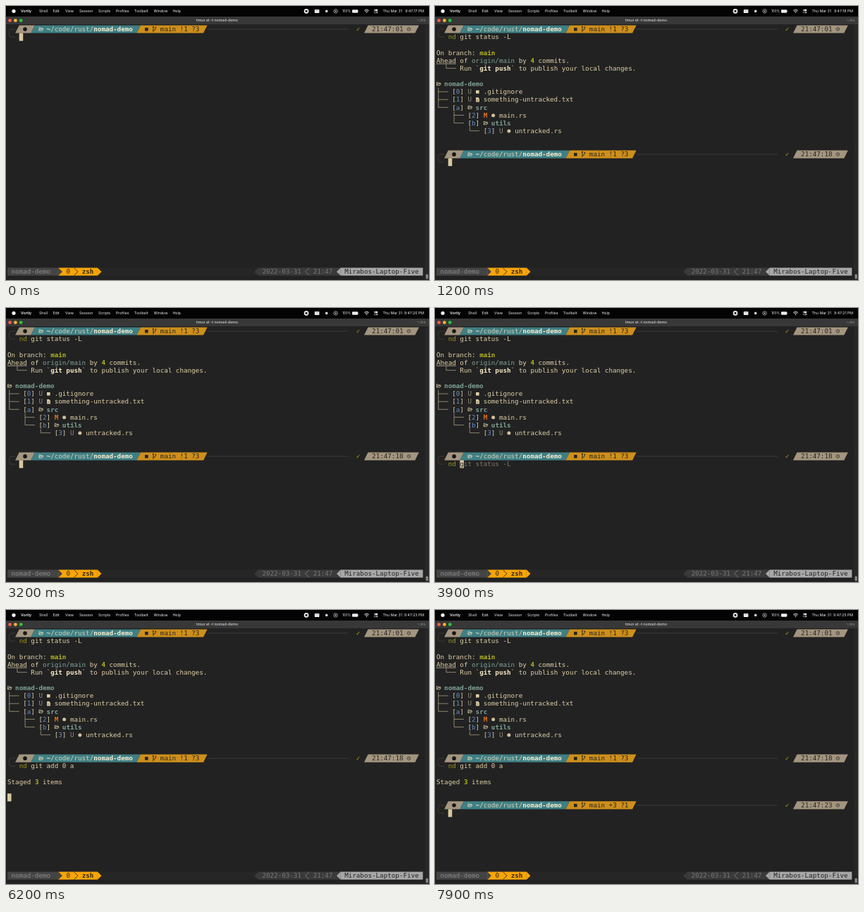
Write an HTML page that moves like this. It is 600 px wide and 390 px high and loops after 8 s.

```html
<!DOCTYPE html>
<html lang="en">
<head>
<meta charset="utf-8">
<title>Terminal session</title>
<style>
  html, body { margin: 0; width: 100%; height: 100%; overflow: hidden; background: #222; }
  svg { display: block; width: 600px; height: 390px; }
  text { white-space: pre; }
  .mono { font: 9.235px "DejaVu Sans Mono", monospace; }
  .ui { font: 5.2px Inter, Roboto, sans-serif; }
  .mono.bold { font-weight: 700; }
  .ui.bold { font-weight: 600; }
</style>
</head>
<body>
<svg id="stage" viewBox="0 0 600 390"></svg>
<script>
const LOOP = 8000;
const CELL = 5.56, LINE = 11.135, LEFT = 2, TOP = 27.4;
const C = {
  fg: '#dfcfa7', dim: '#827769', dark: '#282623', tan: '#a3957f', teal: '#3f7f84', orange: '#ce8f1b',
  green: '#98971a', lime: '#b5b524', aqua: '#7fa395', blue: '#5f8fd3', red: '#e8701c',
  frame: '#45413c', tree: '#b3a68b', cursor: '#d8c8a0'
};
const stage = document.getElementById('stage');
const colX = col => LEFT + col * CELL;
const rowY = row => TOP + row * LINE;

function add(parent, tag, attrs = {}, content) {
  const node = document.createElementNS('http://www.w3.org/2000/svg', tag);
  for (const key in attrs) node.setAttribute(key, attrs[key]);
  if (content !== undefined) node.textContent = content;
  parent.appendChild(node);
  return node;
}
const group = () => add(stage, 'g');
const rect = (parent, x, y, width, height, fill, rx = 0) =>
  add(parent, 'rect', { x, y, width, height, fill, rx });
const circle = (parent, cx, cy, r, fill) => add(parent, 'circle', { cx, cy, r, fill });
const fillPath = (parent, d, fill) => add(parent, 'path', { d, fill });
const strokePath = (parent, d, stroke, width = 0.8) =>
  add(parent, 'path', { d, stroke, fill: 'none', 'stroke-width': width });
const ui = (x, y, content, fill = '#f2f2f2', bold = false) =>
  add(stage, 'text', { x, y, fill, class: bold ? 'ui bold' : 'ui' }, content);

function put(parent, col, row, content, fill = C.fg, bold = false) {
  return add(parent, 'text', {
    x: colX(col), y: rowY(row) + 8.8, fill, class: bold ? 'mono bold' : 'mono'
  }, content);
}

// Consecutive [text, colour, bold] runs on one row.
function runs(parent, col, row, parts) {
  for (const [content, fill, bold] of parts) {
    put(parent, col, row, content, fill, bold);
    col += content.length;
  }
}

function folder(parent, col, row, color) {
  const x = colX(col), y = rowY(row) + 3.4;
  strokePath(parent, `M${x + 0.5} ${y + 4.2}V${y}h2l.7 .9h2.3v1M${x + 0.5} ${y + 4.2}l1.3 -2.3h4.4l-1.2 2.3z`, color, 0.75);
}

function gitMark(parent, col, row, color) {
  rect(parent, colX(col) + 0.4, rowY(row) + 3.5, 4.6, 4.6, color);
}

function branch(parent, col, row) {
  const x = colX(col) + 1.2, y = rowY(row) + 1.8;
  strokePath(parent, `M${x} ${y}v7.8M${x} ${y + 5.6}q3.4 -.4 3.4 -3.2v-.8`, C.dark, 0.9);
  circle(parent, x, y + 0.4, 0.9, C.dark);
  circle(parent, x + 3.4, y + 1.2, 0.9, C.dark);
}

function page(parent, col, row) {
  const x = colX(col) + 0.5, y = rowY(row) + 2.5;
  fillPath(parent, `M${x} ${y}h3l1.8 1.8v4.6h-4.8z`, C.fg);
  strokePath(parent, `M${x + 1} ${y + 3}h2.8m-2.8 1.5h2.8`, '#555047', 0.5);
}

function slant(parent, from, to, row, fill) {
  const y = rowY(row);
  fillPath(parent, `M${colX(from)} ${y + LINE}L${colX(from + 1)} ${y}H${colX(to + 1)}L${colX(to)} ${y + LINE}z`, fill);
}

function prompt(parent, row, changes, time) {
  const mid = rowY(row) + LINE / 2, end = colX(2);
  strokePath(parent, `M${end} ${mid}H7q-2.2 0 -2.2 2.2v${LINE - 4.4}q0 2.2 2.2 2.2H${end}`, C.frame);
  slant(parent, 2, 6, row, C.tan);
  slant(parent, 6, 33, row, C.teal);
  slant(parent, 33, 50, row, C.orange);
  slant(parent, 91, 104, row, C.tan);
  circle(parent, colX(4.5), mid, 2.8, '#161616');
  folder(parent, 8, row, '#eee2c3');
  runs(parent, 10, row, [['~', '#f5e8c6', true], ['/code/rust/', '#d8d1b5'], ['nomad-demo', '#f8edcf', true]]);
  gitMark(parent, 35, row, C.dark);
  branch(parent, 37, row);
  put(parent, 39, row, 'main ' + changes, C.dark);
  strokePath(parent, `M${colX(51)} ${mid}H${colX(87)}`, C.frame);
  put(parent, 89, row, '✓', '#aaa21b');
  put(parent, 93, row, time, C.dark);
  const cx = colX(102.4);
  add(parent, 'circle', { cx, cy: mid, r: 2.3, fill: 'none', stroke: C.dark, 'stroke-width': 0.7 });
  strokePath(parent, `M${cx} ${mid - 1.3}v1.5h1`, C.dark, 0.6);
}

function elbow(parent, col, row, last) {
  const x = colX(col + 0.5), y = rowY(row), mid = y + LINE / 2;
  strokePath(parent, `M${x} ${y}V${last ? mid : y + LINE}M${x} ${mid}H${colX(col + 3)}`, C.tree, 0.75);
}

function entry(parent, col, row, last, key, status, icon, name) {
  elbow(parent, col, row, last);
  runs(parent, col + 4, row, [['[', C.fg], [key, C.blue], [']', C.fg]]);
  if (!status) {
    folder(parent, col + 8, row, C.fg);
    put(parent, col + 10, row, name, C.aqua, true);
    return;
  }
  const modified = status === 'M';
  put(parent, col + 8, row, status, modified ? C.red : '#91877a', modified);
  icon(parent, col + 10, row, C.fg);
  put(parent, col + 12, row, name);
}

const rustMark = (parent, col, row) => circle(parent, colX(col + 0.5), rowY(row) + 5.8, 2.5, '#cfc19f');

function statusReport(parent) {
  runs(parent, 0, 3, [['On branch: ', C.fg], ['main', C.lime, true]]);
  runs(parent, 0, 4, [['Ahead', C.fg], [' of ', C.fg], ['origin/main', C.aqua], [' by ', C.fg], ['4', C.lime, true], [' commits.', C.fg]]);
  strokePath(parent, `M${colX(0)} ${rowY(4) + 10.3}H${colX(5)}`, C.fg, 0.7);
  elbow(parent, 2, 5, true);
  runs(parent, 6, 5, [['Run `', C.fg], ['git push', '#f6e9c6', true], ['` to publish your local changes.', C.fg]]);
  folder(parent, 0, 7, C.fg);
  put(parent, 2, 7, 'nomad-demo', C.aqua, true);
  entry(parent, 0, 8, false, '0', 'U', gitMark, '.gitignore');
  entry(parent, 0, 9, false, '1', 'U', page, 'something-untracked.txt');
  entry(parent, 0, 10, true, 'a', '', null, 'src');
  entry(parent, 4, 11, false, '2', 'M', rustMark, 'main.rs');
  entry(parent, 4, 12, true, 'b', '', null, 'utils');
  entry(parent, 8, 13, true, '3', 'U', rustMark, 'untracked.rs');
}

function menuBar() {
  rect(stage, 0, 0, 600, 15, '#030303');
  circle(stage, 11, 7.3, 2.6, '#f2f2f2');
  ui(21, 9.2, 'Vortly', '#f5f5f5', true);
  const menus = { Shell: 47, Edit: 66.5, View: 84, Session: 104, Scripts: 131, Profiles: 156, Toolbelt: 182, Window: 209.5, Help: 236.5 };
  for (const name in menus) ui(menus[name], 9.2, name);
  circle(stage, 426, 7.4, 3.3, '#f2f2f2');
  rect(stage, 424.6, 6, 2.8, 2.8, '#111', 0.4);
  rect(stage, 437.8, 5, 6.6, 5, '#eee', 0.7);
  strokePath(stage, 'M438.8 6.6h4.6', '#777', 0.5);
  circle(stage, 454.7, 7.4, 1.8, '#ddd');
  add(stage, 'circle', { cx: 467.6, cy: 7.4, r: 2.7, fill: 'none', stroke: '#ddd', 'stroke-width': 0.7 });
  fillPath(stage, 'M466.8 6l2.2 1.4l-2.2 1.4z', '#ddd');
  ui(477, 9.1, '100%').style.fontSize = '4.6px';
  rect(stage, 491, 5.2, 8.2, 4.5, '#eee', 1);
  rect(stage, 499.6, 6.6, 0.7, 1.7, '#999');
  strokePath(stage, 'M508.2 6.5q3.3 -3 6.6 0M509.4 7.9q2.1 -1.8 4.2 0', '#eee', 0.9);
  circle(stage, 511.5, 9.2, 0.8, '#eee');
  rect(stage, 522, 4.8, 5.4, 2.3, '#eee', 1.1);
  circle(stage, 523.3, 5.95, 0.7, '#111');
  add(stage, 'rect', { x: 522.2, y: 8, width: 5, height: 1.9, rx: 0.9, fill: 'none', stroke: '#eee', 'stroke-width': 0.5 });
  circle(stage, 526.2, 8.95, 0.8, '#eee');
  ui(534.5, 9.2, 'Thu Mar 31');
}

function titleBar() {
  rect(stage, 0, 15, 600, 11, '#383838', 2);
  rect(stage, 0, 20, 600, 6, '#383838');
  ['#fb5c55', '#f5b82e', '#2bc441'].forEach((color, i) => circle(stage, 5.6 + i * 7.8, 20.6, 2.4, color));
  ui(299.5, 22.3, 'tmux at -t nomad-demo', '#c2c2c2', true).setAttribute('text-anchor', 'middle');
  const shortcut = ui(595.5, 22.2, '⌥⌘6', '#8a8a8a');
  shortcut.setAttribute('text-anchor', 'end');
  shortcut.style.font = '4.6px "DejaVu Sans", sans-serif';
}

function tmuxBar() {
  const y = rowY(31), mid = y + LINE / 2, bottom = y + LINE;
  const band = (from, to, fill) => rect(stage, colX(from), y, (to - from) * CELL, LINE, fill);
  const tip = (base, point, fill) => fillPath(stage, `M${colX(base)} ${y}L${colX(point)} ${mid}L${colX(base)} ${bottom}z`, fill);
  const chevron = (base, point, color) => strokePath(stage, `M${colX(base)} ${y + 0.4}L${colX(point)} ${mid}L${colX(base)} ${bottom - 0.4}`, color, 0.8);
  band(0, 106, '#262626');
  band(13, 23, '#f7a507');
  band(0, 13, '#444');
  tip(13, 14, '#444');
  tip(23, 24, '#f7a507');
  put(stage, 1, 31, 'nomad-demo', '#8d8d8d');
  put(stage, 15, 31, '0', '#302614');
  chevron(17, 18, '#302614');
  put(stage, 19, 31, 'zsh', '#302614', true);
  tip(64, 63, '#3a3a3a');
  band(64, 85, '#3a3a3a');
  put(stage, 65, 31, '2022-03-31', '#777');
  chevron(77, 76, '#858585');
  put(stage, 78, 31, '21:47', '#777');
  tip(85, 84, '#a7a7a7');
  band(85, 106, '#a7a7a7');
  put(stage, 86, 31, 'Mirabos-Laptop-Five', '#242424');
}

rect(stage, 0, 0, 600, 390, '#222');
menuBar();
titleBar();
rect(stage, 594, 26, 6, 364, '#272727');
rect(stage, 595.6, 381.5, 3.2, 7, '#8b8b8b', 1.6);
tmuxBar();

prompt(stage, 0, '!1 ?3', '21:47:01');
const report = group(), secondPrompt = group(), staged = group(), thirdPrompt = group();
statusReport(report);
prompt(secondPrompt, 16, '!1 ?3', '21:47:18');
runs(staged, 0, 19, [['Staged ', C.fg], ['3', C.lime, true], [' items', C.fg]]);
prompt(thirdPrompt, 22, '+3 ?1', '21:47:23');

const cursor = rect(stage, 0, 0, CELL, LINE, C.cursor);
const clock = ui(593, 9.2, '');
clock.setAttribute('text-anchor', 'end');

function commandLine(row) {
  const parts = [C.green, C.fg, C.dark, C.dim].map(color => put(stage, 3, row, '', color));
  return (typed, hint) => {
    const pieces = [typed.slice(0, 2), typed.slice(2), hint.slice(0, 1), hint.slice(1)];
    let col = 3;
    parts.forEach((part, i) => {
      part.textContent = pieces[i];
      part.setAttribute('x', colX(col));
      col += pieces[i].length;
    });
  };
}
const firstLine = commandLine(1), secondLine = commandLine(17);

const STATUS = 'nd git status -L', ADD = 'nd git add 0 a';
const REPORT_AT = 700, PROMPT2_AT = 850, STAGED_AT = 6000, PROMPT3_AT = 6300;
const firstKeys = [200, 300, 400];
const secondKeys = Array.from(ADD, (_, i) => i < 3 ? 3600 + i * 110 : 3930 + (i - 3) * 115);
const pressed = (keys, t) => keys.filter(at => at <= t).length;
const show = (node, on) => node.setAttribute('visibility', on ? 'visible' : 'hidden');

function moveCursor(col, row) {
  cursor.setAttribute('x', colX(col));
  cursor.setAttribute('y', rowY(row));
}

function render(t) {
  const seconds = 17 + Math.floor((t + 700) / 1000);
  clock.textContent = `9:47:${seconds} PM`;

  const count1 = t >= 500 ? STATUS.length : pressed(firstKeys, t);
  firstLine(STATUS.slice(0, count1), count1 ? STATUS.slice(count1) : '');

  const count2 = pressed(secondKeys, t);
  const match = count2 > 7 ? ADD : STATUS;
  secondLine(ADD.slice(0, count2), count2 ? match.slice(count2) : '');

  show(report, t >= REPORT_AT);
  show(secondPrompt, t >= PROMPT2_AT);
  show(staged, t >= STAGED_AT);
  show(thirdPrompt, t >= PROMPT3_AT);

  if (t >= PROMPT3_AT) moveCursor(3, 23);
  else if (t >= STAGED_AT) moveCursor(0, 21);
  else if (t >= PROMPT2_AT) moveCursor(3 + count2, 17);
  else if (t >= REPORT_AT) moveCursor(0, 15);
  else moveCursor(3 + count1, 1);
}

const start = performance.now();
function frame() {
  render((performance.now() - start) % LOOP);
  requestAnimationFrame(frame);
}
render(0);
requestAnimationFrame(frame);
</script>
</body>
</html>
```
